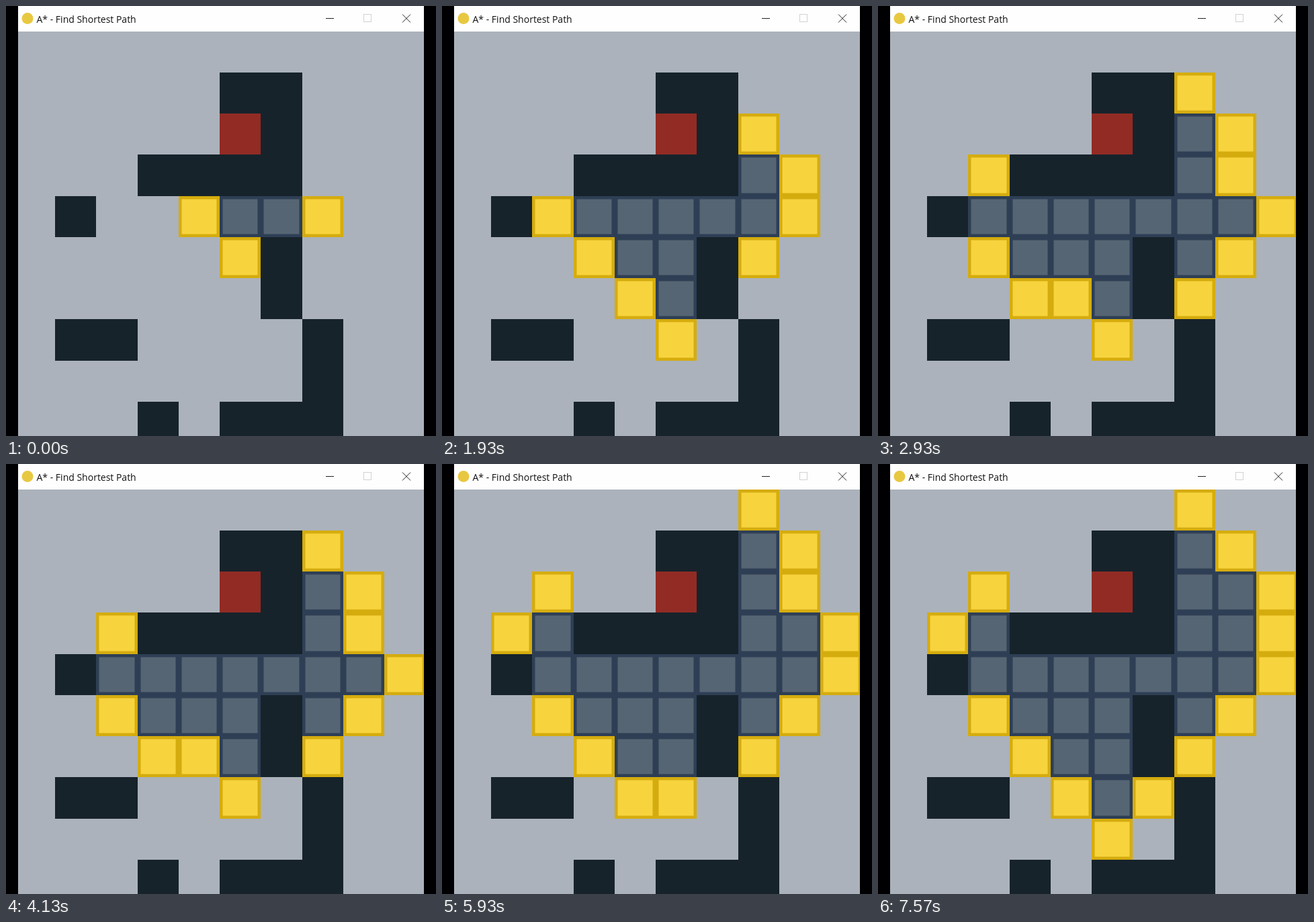
Animation, 640 px wide and 640 px high, one loop 8000 ms. Source, as an HTML page:

```html
<!DOCTYPE html>
<html lang="en">
<head>
<meta charset="utf-8">
<title>A* - Find Shortest Path</title>
<style>
  html, body { margin: 0; width: 100%; height: 100%; overflow: hidden; background: #000002; }
  svg { display: block; width: 100%; height: 100%; }
  text { font: 14px "Open Sans", "Noto Sans", sans-serif; fill: #111; }
</style>
</head>
<body>
<svg viewBox="0 0 640 640">
  <clipPath id="window"><rect x="18" width="604" height="640"/></clipPath>
  <g clip-path="url(#window)">
    <rect width="640" height="640" fill="#abb2bb"/>
    <g id="board"></g>
    <rect width="640" height="38" fill="#fefefe"/>
    <circle cx="32" cy="18.5" r="8.5" fill="#e8c840"/>
    <text x="45.5" y="25">A* - Find Shortest Path</text>
    <g fill="none" stroke="#222">
      <path d="M476 18.5h12"/>
      <rect x="532.5" y="12.5" width="11" height="11" stroke="#d2d2d2"/>
      <path d="M590 12.5l12 12m0-12l-12 12"/>
    </g>
  </g>
</svg>
<script>
const LOOP = 8000, BORDER = 4.5;
const MAP = [
  '..........',
  '.....##...',
  '.....G#...',
  '...####...',
  '.#........',
  '......#...',
  '......#...',
  '.##....#..',
  '.......#..',
  '...#.###..',
];
// Cells expanded at each time, written as column and row digits.
const STEPS = [
  [0, '54 64'],
  [930, '34 44 74 45 55'],
  [1930, '73 56'],
  [2930, '72 24 35 84 75'],
  [4930, '83 46'],
  [5930, '71 23'],
  [6930, '82 57'],
];
const LOOKS = {
  empty: { opacity: 0, fill: '#f7d33e', stroke: '#d5ac0e' },
  open: { opacity: 1, fill: '#f7d33e', stroke: '#d5ac0e' },
  closed: { opacity: 1, fill: '#566573', stroke: '#2e3f55' },
};

const board = document.getElementById('board');
const edgeX = col => Math.round(12 + 61.22 * col);
const edgeY = row => Math.round(37.8 + 61.22 * row);

function addCell(col, row, inset, attrs) {
  const rect = document.createElementNS('http://www.w3.org/2000/svg', 'rect');
  const x = edgeX(col), y = edgeY(row);
  const box = {
    x: x + inset, y: y + inset,
    width: edgeX(col + 1) - x - 2 * inset,
    height: edgeY(row + 1) - y - 2 * inset,
  };
  for (const [name, value] of Object.entries({ ...box, ...attrs })) rect.setAttribute(name, value);
  return board.appendChild(rect);
}

const closed = new Set();
const states = STEPS.map(([time, cells]) => {
  cells.split(' ').forEach(cell => closed.add(cell));
  return { time, closed: new Set(closed) };
});

// An unexpanded cell is open once any of its four neighbours is closed.
function lookAt(state, col, row) {
  if (state.closed.has(`${col}${row}`)) return LOOKS.closed;
  const near = [[1, 0], [-1, 0], [0, 1], [0, -1]]
    .some(([dx, dy]) => state.closed.has(`${col + dx}${row + dy}`));
  return near ? LOOKS.open : LOOKS.empty;
}

const animations = [];
MAP.forEach((line, row) => [...line].forEach((kind, col) => {
  if (kind === '#') return addCell(col, row, 0, { fill: '#17232b' });
  if (kind === 'G') return addCell(col, row, 0, { fill: '#922b24' });
  const keyframes = states.map(state => ({
    ...lookAt(state, col, row), offset: state.time / LOOP, easing: 'steps(1, end)',
  }));
  keyframes.push({ ...keyframes.at(-1), offset: 1 });
  if (keyframes.every(frame => !frame.opacity)) return;
  const cell = addCell(col, row, BORDER / 2, { 'stroke-width': BORDER });
  animations.push(cell.animate(keyframes, { duration: LOOP, iterations: Infinity }));
}));
animations.forEach(animation => { animation.startTime = document.timeline.currentTime; });
</script>
</body>
</html>
```
